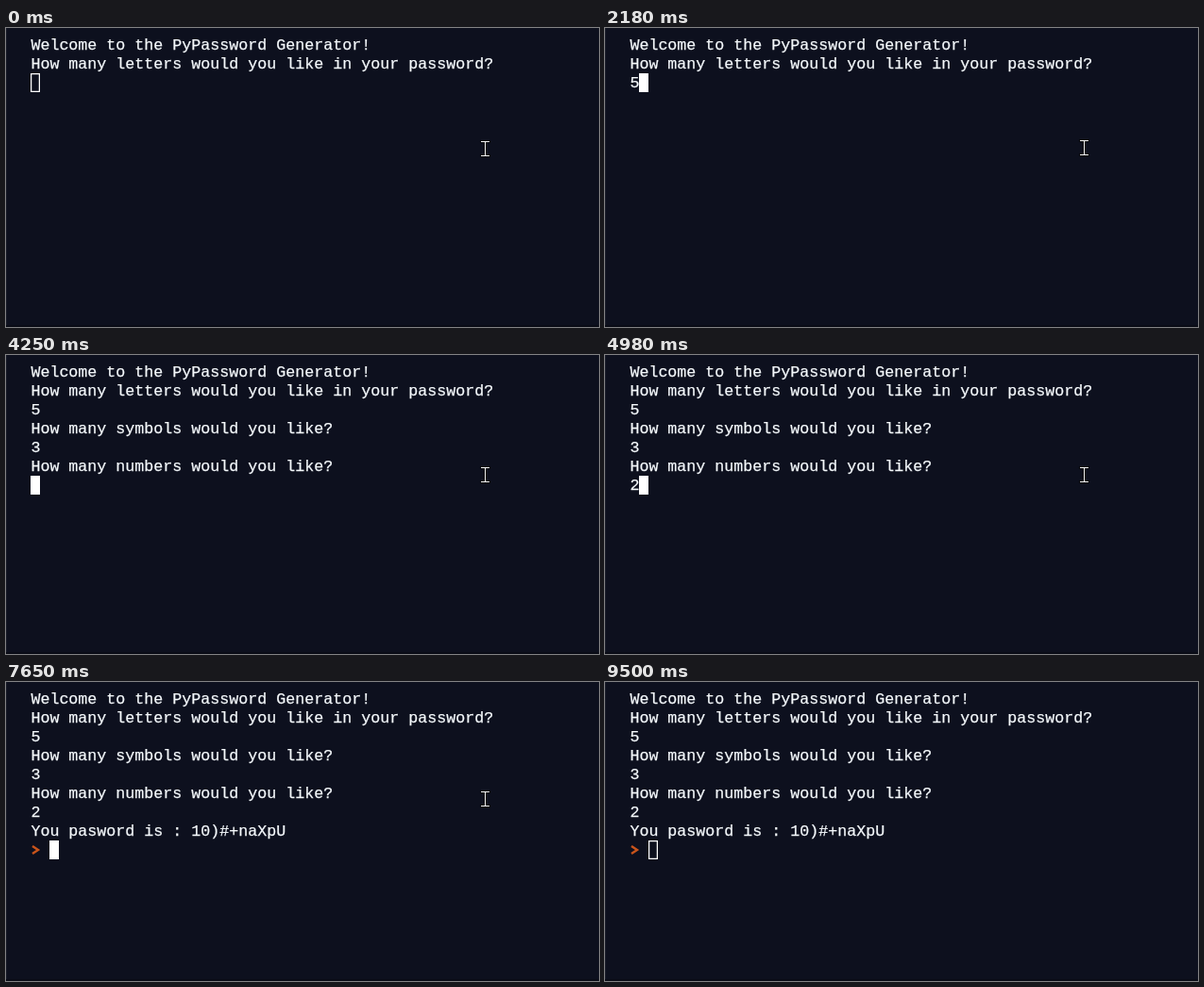
Recreate the animation shown at these times as an HTML page with a canvas. Size 628 px wide and 317 px high, loop 9.64 s.

```html
<!DOCTYPE html>
<html lang="en">
<head>
<meta charset="utf-8">
<title>Password generator console</title>
<style>
html, body { margin: 0; width: 100%; height: 100%; overflow: hidden; background: #0d101e; }
#stage { position: relative; width: 628px; height: 317px; overflow: hidden; }
canvas { position: absolute; left: 0; top: 0; }
pre {
  position: absolute; left: 26.4px; top: 9px; margin: 0;
  font: 16.667px/20px "Courier New", "Liberation Mono", monospace;
  color: #f5f9fc; font-variant-ligatures: none;
  -webkit-text-stroke: 0.25px #f5f9fc;
}
</style>
</head>
<body>
<div id="stage">
  <canvas id="view" width="628" height="317"></canvas>
  <pre id="out"></pre>
</div>
<script>
const LOOP = 9640;
const ctx = document.getElementById("view").getContext("2d");
const out = document.getElementById("out");

// Console output, each piece appended at its time
const script = [
  [0, "Welcome to the PyPassword Generator!\nHow many letters would you like in your password?\n"],
  [2180, "5"],
  [3060, "\nHow many symbols would you like?\n"],
  [3660, "3"],
  [4250, "\nHow many numbers would you like?\n"],
  [4980, "2"],
  [5650, "\nYou pasword is : 10)#+naXpU\n  "]
];

// Pointer moves: start, end, steps, then the points passed through
const moves = [
  { from: 330, to: 520, steps: 4, path: [[507, 128], [517, 135], [507, 127]] },
  { from: 7650, to: 7770, steps: 3, path: [[507, 127], [507, 124], [509, 105], [510, 81]], linear: true },
  { from: 8170, to: 8440, steps: 5, path: [[510, 81], [337, 235]] },
  { from: 8640, to: 8640, steps: 1, path: [[337, 235], [377, 261]] }
];
const FOCUS = 390, BLUR = 9500, HIDE = 8710, PROMPT = 5650;

function along(path, u) {
  const s = u * (path.length - 1);
  const i = Math.min(Math.floor(s), path.length - 2);
  const f = s - i;
  return [0, 1].map(k => Math.round(path[i][k] + (path[i + 1][k] - path[i][k]) * f));
}

function pointerAt(t) {
  let spot = moves[0].path[0];
  for (const m of moves) {
    if (t < m.from) break;
    const gap = (m.to - m.from) / Math.max(1, m.steps - 1);
    const done = gap ? Math.min(m.steps, Math.floor((t - m.from) / gap + 1e-6) + 1) : 1;
    const u = done / m.steps;
    spot = along(m.path, m.linear ? u : u * u * (3 - 2 * u));
  }
  return spot;
}

function drawPointer([x, y]) {
  const bars = [[-4, -8, 9, 1], [0, -7, 1, 14], [-4, 7, 9, 1]];
  ctx.fillStyle = "#05060b";
  for (const [a, b, w, h] of bars) ctx.fillRect(x + a - 1, y + b - 1, w + 2, h + 2);
  ctx.fillStyle = "#f4f4f4";
  for (const [a, b, w, h] of bars) ctx.fillRect(x + a, y + b, w, h);
}

function drawCaret(x, y, solid) {
  const line = 1.25;
  ctx.fillStyle = ctx.strokeStyle = "#ffffff";
  ctx.lineWidth = line;
  if (solid) ctx.fillRect(x, y, 10, 20);
  else ctx.strokeRect(x + line / 2, y + line / 2, 10 - line, 20 - line);
}

function drawPrompt() {
  ctx.strokeStyle = "#c9541b";
  ctx.lineWidth = 2.4;
  ctx.beginPath();
  ctx.moveTo(28, 174);
  ctx.lineTo(34, 178);
  ctx.lineTo(28, 182);
  ctx.stroke();
}

function draw(t) {
  const text = script.filter(p => t >= p[0]).map(p => p[1]).join("");
  if (out.textContent !== text) out.textContent = text;

  ctx.fillStyle = "#0d101e";
  ctx.fillRect(0, 0, 628, 317);
  ctx.fillStyle = "#1a1d2a";
  ctx.fillRect(0, 0, 1, 317);
  ctx.fillStyle = "#0a0c16";
  ctx.fillRect(0, 315, 628, 2);

  const rows = text.split("\n");
  const row = rows.length - 1;
  drawCaret(26 + rows[row].length * 10, 8 + row * 20, t >= FOCUS && t < BLUR);
  if (t >= PROMPT) drawPrompt();
  if (t < HIDE) drawPointer(pointerAt(t));
}

const start = performance.now();
function tick() {
  draw((performance.now() - start) % LOOP);
  requestAnimationFrame(tick);
}
draw(0);
requestAnimationFrame(tick);
</script>
</body>
</html>
```
